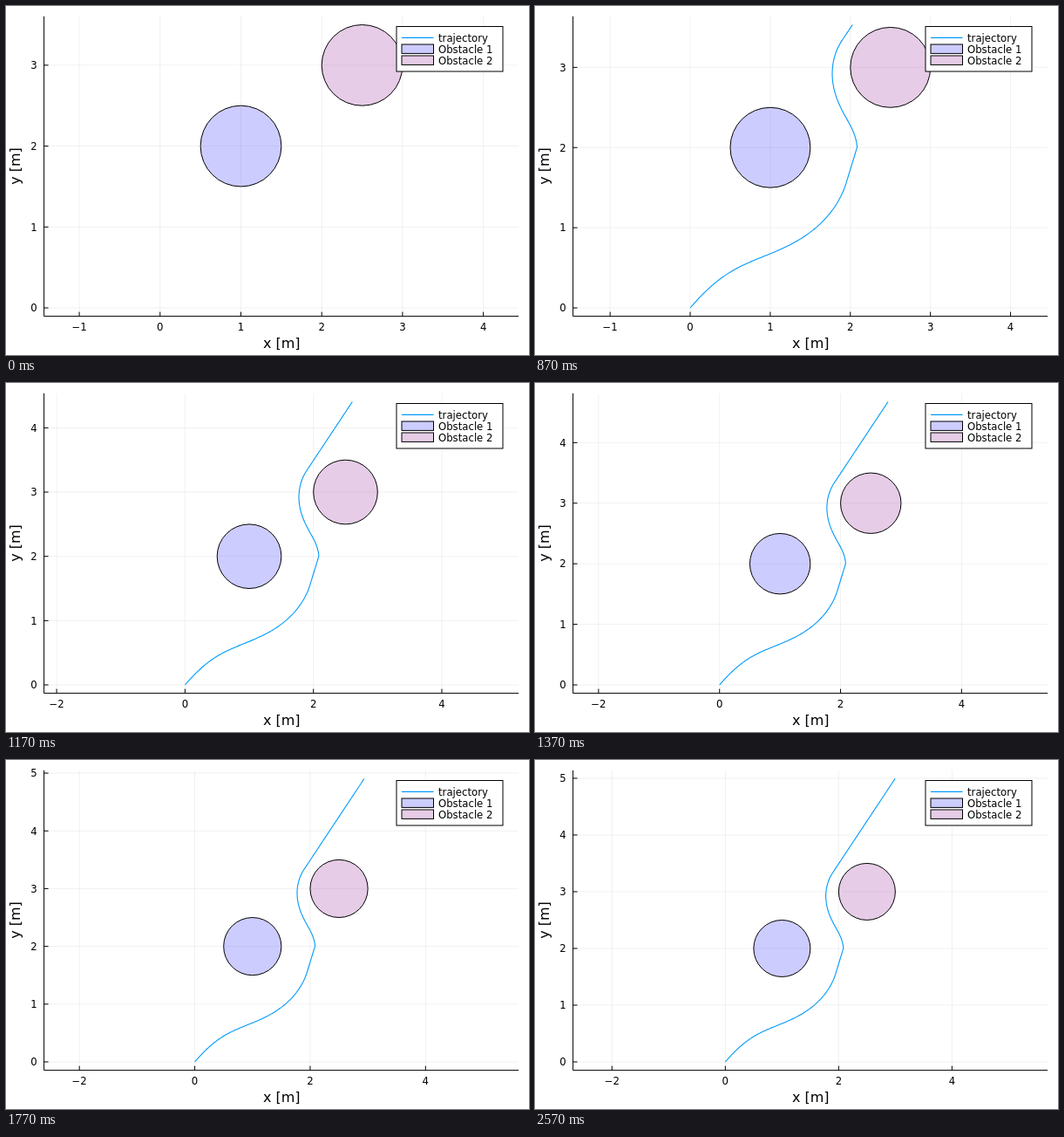
These frames come from a looping animation (600 by 400 pixels, 2610 ms). An HTML page:

```html
<!DOCTYPE html>
<html lang="en">
<head>
<meta charset="utf-8">
<title>Obstacle avoidance</title>
<style>
html, body { margin: 0; width: 100%; height: 100%; overflow: hidden; background: #fff; }
svg { display: block; width: 600px; height: 400px; }
text { font: 11.7px "DejaVu Sans", sans-serif; fill: #000; }
.title { font-size: 16px; text-anchor: middle; }
.blue { fill: #ccf; fill: rgba(0, 0, 255, .2); }
.purple { fill: rgba(128, 0, 128, .2); }
.edge { stroke: #000; stroke-width: 1; }
.path { fill: none; stroke: #009afa; stroke-width: 1.1; stroke-linejoin: round; }
.grid { stroke: #000; stroke-opacity: .06; stroke-width: 1; }
</style>
</head>
<body>
<svg viewBox="0 0 600 400">
  <rect width="600" height="400" fill="#fff"/>
  <path id="grid" class="grid"/>
  <path id="axes" class="edge" fill="none"/>
  <g id="labels"></g>
  <text class="title" x="316.3" y="392">x [m]</text>
  <text class="title" transform="translate(16 183.5) rotate(-90)">y [m]</text>
  <path id="track" class="path"/>
  <circle id="ob1" class="blue edge"/>
  <circle id="ob2" class="purple edge"/>
  <rect class="edge" x="448" y="23.5" width="122" height="51.5" fill="#fff"/>
  <path class="path" d="M454 36.4H490.5"/>
  <rect class="blue edge" x="454" y="44" width="36.5" height="10.4"/>
  <rect class="purple edge" x="454" y="57" width="36.5" height="10.4"/>
  <text x="496" y="40.5">trajectory</text>
  <text x="496" y="53.6">Obstacle 1</text>
  <text x="496" y="66.7">Obstacle 2</text>
</svg>
<script>
const $ = id => document.getElementById(id);
const LOOP = 2610, LAST = 77, PER_STEP = 10, DT = 0.01;
const LEFT = 43.6, RIGHT = 588.1, TOP = 11.8, BOTTOM = 355.6;
const BASE = 346, SPAN = 324.5, MID_X = 1.5;
const GOAL = [3, 5], RADIUS = 0.5;
const OBSTACLES = [[1, 2], [2.5, 3]];

// Head for the goal; limit the approach speed towards the nearest obstacle.
function simulate() {
  let x = 0, y = 0;
  const pts = [[x, y]];
  for (let i = 0; i < LAST * PER_STEP; i++) {
    let vx = GOAL[0] - x, vy = GOAL[1] - y;
    const [a, b] = OBSTACLES.map(([cx, cy]) => {
      const d = Math.hypot(x - cx, y - cy);
      return { d, nx: (x - cx) / d, ny: (y - cy) / d };
    });
    const near = a.d <= b.d ? a : b;
    const excess = -(near.d - RADIUS) - (vx * near.nx + vy * near.ny);
    if (excess > 0) {
      vx += excess * near.nx;
      vy += excess * near.ny;
    }
    x += vx * DT;
    y += vy * DT;
    pts.push([x, y]);
  }
  return pts;
}

const points = simulate();
let shown = -1;

function ticks(lo, hi, step) {
  const out = [];
  for (let v = Math.ceil(lo / step) * step; v <= hi; v += step) out.push(v + 0);
  return out;
}

function label(v, x, y, anchor) {
  const s = v < 0 ? "\u2212" + -v : String(Math.abs(v));
  return `<text x="${x.toFixed(2)}" y="${y.toFixed(2)}" text-anchor="${anchor}">${s}</text>`;
}

function draw(step) {
  const n = step * PER_STEP;
  const yMax = Math.max(3.5, points[n][1]);
  const scale = SPAN / yMax;
  const px = x => (LEFT + RIGHT) / 2 + (x - MID_X) * scale;
  const py = y => BASE - y * scale;
  const half = (RIGHT - LEFT) / 2 / scale;
  const xs = ticks(MID_X - half, MID_X + half, half >= 3.5 ? 2 : 1);
  const ys = ticks(0, yMax * 1.03, 1);

  let grid = "", text = "";
  let axes = `M${LEFT} ${TOP}V${BOTTOM}H${RIGHT}`;
  for (const v of xs) {
    const x = px(v);
    grid += `M${x} ${TOP}V${BOTTOM}`;
    axes += `M${x} ${BOTTOM}v-5`;
    text += label(v, x, 371.6, "middle");
  }
  for (const v of ys) {
    const y = py(v);
    grid += `M${LEFT} ${y}H${RIGHT}`;
    axes += `M${LEFT} ${y}h5`;
    text += label(v, 35.7, y + 4.3, "end");
  }
  $("grid").setAttribute("d", grid);
  $("axes").setAttribute("d", axes);
  $("labels").innerHTML = text;

  OBSTACLES.forEach(([cx, cy], i) => {
    const c = $("ob" + (i + 1));
    c.setAttribute("cx", px(cx));
    c.setAttribute("cy", py(cy));
    c.setAttribute("r", RADIUS * scale);
  });

  const line = points.slice(0, n + 1).map(([x, y]) => px(x).toFixed(2) + " " + py(y).toFixed(2));
  $("track").setAttribute("d", n ? "M" + line.join("L") : "");
}

// Steps are a thirtieth of a second, rounded to 10 ms.
function stepAt(ms) {
  const r = ms % 100;
  return Math.min(LAST, Math.floor(ms / 100) * 3 + (r >= 70 ? 2 : r >= 30 ? 1 : 0));
}

function tick() {
  const step = stepAt(performance.now() % LOOP);
  if (step !== shown) draw(shown = step);
  requestAnimationFrame(tick);
}
tick();
</script>
</body>
</html>
```
